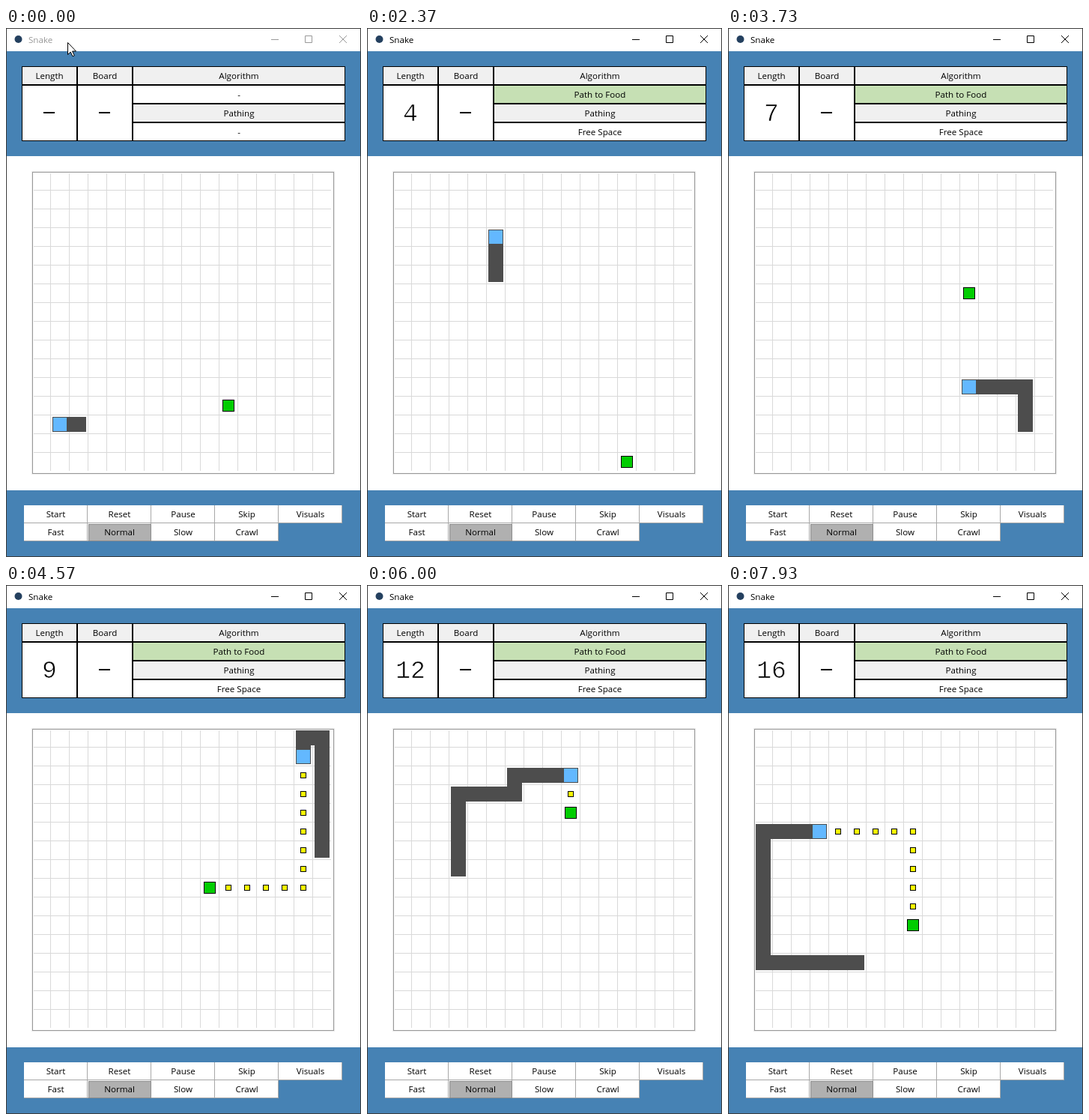
These frames come from a looping animation (474x706 px, 8000 ms). An HTML page:

```html
<!DOCTYPE html>
<html lang="en">
<head>
<meta charset="utf-8">
<title>Snake</title>
<style>
  html, body { margin: 0; width: 100%; height: 100%; overflow: hidden; background: #fff; }
  svg { display: block; width: 474px; height: 706px; }
  text { font: 11.6px "Open Sans", "Noto Sans", sans-serif; fill: #000; }
  .mid { text-anchor: middle; }
  .count { font: 33px "Liberation Mono", monospace; stroke: #fff; stroke-width: .7; }
</style>
</head>
<body>
<svg id="stage" viewBox="0 0 474 706"></svg>
<script>
const LOOP = 8000, RUN_AT = 1640, FOCUS_AT = 1560;
const stage = document.getElementById('stage');

function add(tag, attrs, parent = stage) {
  const el = document.createElementNS('http://www.w3.org/2000/svg', tag);
  for (const key in attrs) el.setAttribute(key, attrs[key]);
  parent.append(el);
  return el;
}
const fillBox = (x, y, w, h, fill, parent) => add('rect', { x, y, width: w, height: h, fill }, parent);
const lineBox = (x, y, w, h, fill, stroke, parent) =>
  add('rect', { x: x + .5, y: y + .5, width: w - 1, height: h - 1, fill, stroke }, parent);
function label(str, x, y, cls = 'mid') {
  const el = add('text', { x, y, class: cls });
  el.textContent = str;
  return el;
}
function show(el, on) { el.setAttribute('visibility', on ? 'visible' : 'hidden'); }

// Window and title bar
lineBox(0, 0, 474, 706, '#fff', '#3c3c3c');
fillBox(1, 31, 472, 140, '#4682b4');
fillBox(1, 617, 472, 88, '#4682b4');
add('circle', { cx: 16.5, cy: 15, r: 5, fill: '#24405f' });
const title = label('Snake', 30, 20, '');
const controls = add('path', {
  d: 'M354 15.5h10M399.5 10.5h9v9h-9zM445 10l10 10M455 10l-10 10', fill: 'none'
});

// Info table
function cell(x, y, w, h, str, fill) {
  const box = lineBox(x, y, w, h, fill, '#000');
  return { box, text: label(str, x + w / 2, y + 17) };
}
cell(21, 51, 74, 25, 'Length', '#f0f0f0');
cell(95, 51, 74, 25, 'Board', '#f0f0f0');
cell(169, 51, 284, 25, 'Algorithm', '#f0f0f0');
cell(21, 76, 74, 75, '', '#fff');
cell(95, 76, 74, 75, '', '#fff');
const algorithm = cell(169, 76, 284, 25, '-', '#fff');
cell(169, 101, 284, 25, 'Pathing', '#f0f0f0');
const pathing = cell(169, 126, 284, 25, '-', '#fff');
const lengthDash = fillBox(50, 112, 15, 2, '#000');
fillBox(124, 112, 15, 2, '#000');
const count = label('', 58, 124, 'mid count');

// Buttons
[['Start', 'Reset', 'Pause', 'Skip', 'Visuals'], ['Fast', 'Normal', 'Slow', 'Crawl']].forEach((row, r) =>
  row.forEach((name, c) => {
    const x = 24 + 85 * c, y = 637 + 24 * r, on = name === 'Normal';
    fillBox(x, y, 85, 24, '#a8a8a8');
    fillBox(x, y, 84, 23, '#fff');
    if (on) lineBox(x + 1, y + 1, 84, 23, '#b0b0b0', '#8c8c8c');
    label(name, x + 42.5, y + 16);
  }));

// Board
lineBox(34, 191, 405, 405, 'none', '#ececec');
lineBox(35, 192, 403, 403, '#fff', '#999');
let grid = '';
for (let i = 0; i < 15; i++) grid += `M${59.5 + 25 * i} 194V591M37 ${216.5 + 25 * i}H434`;
add('path', { d: grid, stroke: '#d9d9d9' });

const px = c => 47 + 25 * c, py = r => 204 + 25 * r;
const square = (half, fill, stroke) => lineBox(-half, -half, 2 * half, 2 * half, fill, stroke);
const place = (el, [c, r]) => el.setAttribute('transform', `translate(${px(c)} ${py(r)})`);

const dots = Array.from({ length: 30 }, () => square(4, '#ff0', '#000'));
const food = square(8, '#00cd00', '#000');
const body = add('polyline', {
  fill: 'none', stroke: '#4d4d4d', 'stroke-width': 20, 'stroke-linecap': 'square', 'stroke-linejoin': 'miter'
});
const head = square(10, '#63b8ff', '#4d4d4d');
const cursor = add('path', {
  d: 'M.5 .5V16.5L4.2 13L7 18.8L9.3 17.8L6.6 12H11.5Z', fill: '#fff', stroke: '#000'
});

// Game: shortest routes, trying right, down, left, up, never back into the neck
const same = (a, b) => a[0] === b[0] && a[1] === b[1];
const gap = (a, b) => Math.abs(a[0] - b[0]) + Math.abs(a[1] - b[1]);
const DIRS = [[1, 0], [0, 1], [-1, 0], [0, -1]];
function nextCell(from, neck, goal) {
  return DIRS.map(d => [from[0] + d[0], from[1] + d[1]])
    .find(p => gap(p, goal) < gap(from, goal) && !same(p, neck));
}
function route(from, neck, goal) {
  const cells = [];
  for (;;) {
    const p = nextCell(from, neck, goal);
    if (same(p, goal)) return cells;
    cells.push(p);
    [neck, from] = [from, p];
  }
}

const FOODS = [[5, 3], [12, 15], [14, 11], [11, 11], [11, 6], [15, 0], [9, 8], [3, 3],
  [6, 2], [9, 4], [14, 7], [7, 12], [0, 5], [8, 10]];
const STEPS = 128;
const states = [];
(function play() {
  const trail = [[1, 13], [2, 13]];
  let length = 3, meal = 0;
  for (let n = 0; n <= STEPS; n++) {
    let ate = false;
    if (n) {
      trail.unshift(nextCell(trail[0], trail[1], FOODS[meal]));
      ate = same(trail[0], FOODS[meal]);
      if (ate) { length++; meal++; }
    }
    states.push({
      length, food: FOODS[meal],
      cells: trail.slice(0, ate ? length - 1 : length),
      path: ate ? [] : route(trail[0], trail[1], FOODS[meal])
    });
  }
})();
const idle = { food: [10, 12], cells: states[0].cells, path: [] };

// Piecewise linear value over [time, value...] keys
function track(keys, t) {
  let i = 0;
  while (i < keys.length - 2 && t >= keys[i + 1][0]) i++;
  const [a, b] = [keys[i], keys[i + 1]];
  const u = Math.min(1, Math.max(0, (t - a[0]) / (b[0] - a[0])));
  return a.slice(1).map((v, k) => v + (b[k + 1] - v) * u);
}
const PACE = [[1670, 0], [2370, 14], [3730, 42], [5330, 75], [6700, 104], [7930, STEPS]];
const POINTER = [[1200, 72, 703], [1440, 68, 651], [1740, 68, 651], [2000, 74, 708]];

function draw(t) {
  const running = t >= RUN_AT, active = t >= FOCUS_AT;
  const state = running ? states[Math.floor(track(PACE, t)[0] + 1e-6)] : idle;

  title.style.fill = active ? '#000' : '#999';
  controls.setAttribute('stroke', active ? '#000' : '#999');
  algorithm.text.textContent = running ? 'Path to Food' : '-';
  algorithm.box.setAttribute('fill', running ? '#c6e0b4' : '#fff');
  pathing.text.textContent = running ? 'Free Space' : '-';
  show(lengthDash, !running);
  count.textContent = running ? state.length : '';

  body.setAttribute('points', state.cells.map(([c, r]) => px(c) + ',' + py(r)).join(' '));
  place(head, state.cells[0]);
  place(food, state.food);
  dots.forEach((dot, i) => {
    const cell = state.path[i];
    show(dot, cell);
    if (cell) place(dot, cell);
  });

  const [x, y] = t < 30 ? [82, 19] : t < 70 ? [24, 26] : track(POINTER, t).map(Math.round);
  cursor.setAttribute('transform', `translate(${x} ${y})`);
  show(cursor, t < 70 || (t >= 1200 && t < 2000));
}

const begin = performance.now();
function tick() {
  draw((performance.now() - begin) % LOOP);
  requestAnimationFrame(tick);
}
draw(0);
requestAnimationFrame(tick);
</script>
</body>
</html>
```
